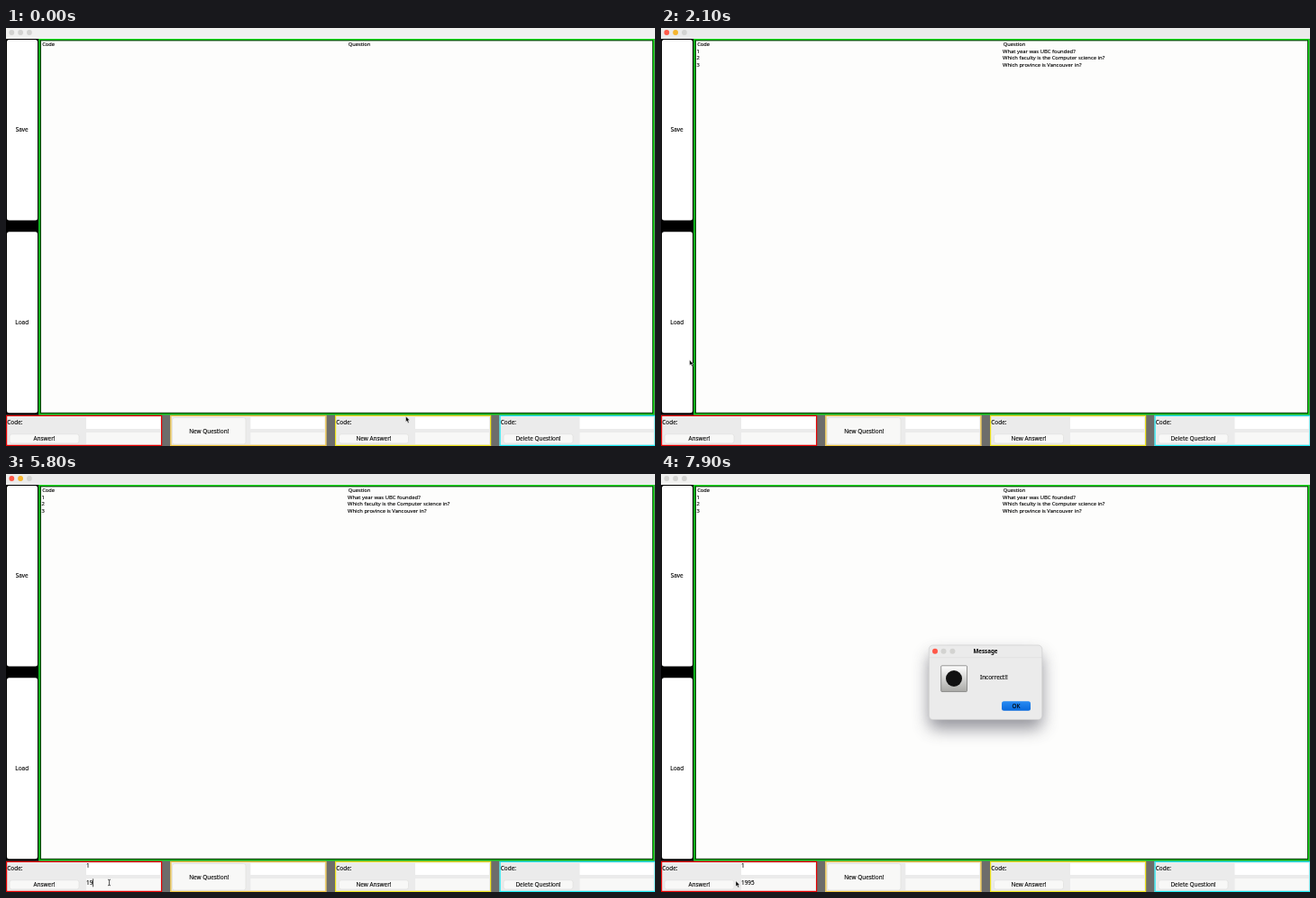
These frames come from a looping animation (720x464 px, 8000 ms). An HTML page:

```html
<!DOCTYPE html>
<html lang="en">
<head>
<meta charset="utf-8">
<title>Quiz window</title>
<style>
  html, body { margin: 0; width: 100%; height: 100%; overflow: hidden; }
  svg { display: block; width: 720px; height: 464px; }
  text { font: 6.4px "Noto Sans", "Open Sans", sans-serif; fill: #000; stroke: #000; stroke-width: .12px; white-space: pre; }
  .cell { font-size: 5.85px; }
  .head { font-size: 5.7px; }
  .title { font-size: 6.2px; font-weight: 600; stroke: none; }
  .mid { text-anchor: middle; }
</style>
</head>
<body>
<svg id="stage" viewBox="0 0 720 464">
  <defs>
    <filter id="blur" x="-50%" y="-50%" width="200%" height="200%"><feGaussianBlur stdDeviation="9"/></filter>
    <linearGradient id="tile" x2="0" y2="1"><stop stop-color="#fff"/><stop offset="1" stop-color="#a9a9a6"/></linearGradient>
    <linearGradient id="blue" x2="0" y2="1"><stop stop-color="#298bf2"/><stop offset="1" stop-color="#0869dc"/></linearGradient>
  </defs>
</svg>
<script>
const PANEL = '#ebebeb', PAPER = '#fdfdfc', FADED = '#d3d3d1', BUTTON = '#f8f8f7', EDGE = '#dcdcda';
const LIME = '#00e414', DARK_GREEN = '#064a08';
const stage = document.getElementById('stage');

const rect = (x, y, w, h, fill, extra = '') =>
  `<rect x="${x}" y="${y}" width="${w}" height="${h}" fill="${fill}" ${extra}/>`;
const dot = (x, y, r, fill, id = '') => `<circle id="${id}" cx="${x}" cy="${y}" r="${r}" fill="${fill}"/>`;
const text = (x, y, s, cls = '', id = '') => `<text x="${x}" y="${y}" class="${cls}" id="${id}">${s}</text>`;
const outline = color => `stroke="${color}" stroke-width=".6"`;

function sideButton(y, h, label, id) {
  return rect(1, y, 34, h, '#fff', `rx="2.5" id="${id}"`) + text(17.7, y + h / 2 + 2.2, label, 'mid');
}

function panel(x, color, label, button) {
  const [bx, by, bw, bh, id] = button.box;
  return rect(x, 430, 173, 34, PANEL)
    + rect(x + .6, 430.4, 172, 33, 'none', `stroke="${color}" stroke-width="1.2"`)
    + rect(x + 89, 432, 82, 13, '#fff') + rect(x + 89, 449, 82, 13, '#f8f8f7')
    + rect(bx, by, bw, bh, BUTTON, `rx="2.5" id="${id}" ${outline(EDGE)}`)
    + text(bx + bw / 2, by + bh / 2 + 2.3, button.label, 'mid')
    + (label ? text(x + 1.3, 440, label) : '');
}

function table() {
  const rows = ['What year was UBC founded?', 'Which faculty is the Computer science in?', 'Which province is Vancouver in?'];
  return rect(36.3, 12, 683, 417.4, LIME) + rect(37.6, 13.2, 680.4, 415, DARK_GREEN)
    + rect(39, 14.4, 678, 412.4, PAPER)
    + text(40.2, 19.7, 'Code', 'head') + text(379.8, 19.7, 'Question', 'head')
    + '<g id="rows">' + rows.map((q, i) =>
      text(39.6, 27.6 + i * 7.8, i + 1, 'cell') + text(379, 27.6 + i * 7.8, q, 'cell')).join('') + '</g>';
}

function dialog() {
  return '<g id="dialog">'
    + rect(297, 200, 126, 83, '#50505c', 'rx="8" opacity=".6" filter="url(#blur)"')
    + rect(297.3, 190, 125.5, 82.7, PANEL, `rx="4.5" ${outline('#c9c9c9')}`)
    + rect(297.5, 203.6, 125, .5, '#d8d8d8')
    + dot(304, 196.8, 3, '#ff5748') + dot(313.5, 196.8, 3, FADED) + dot(323.4, 196.8, 3, FADED)
    + text(360, 199, 'Message', 'mid title')
    + rect(310.7, 212.8, 28.8, 28.8, 'url(#tile)', 'stroke="#6e6e6c" stroke-width=".7" rx="1"')
    + dot(325, 227, 9, '#111')
    + text(354, 228.4, 'Incorrect!!')
    + rect(378, 252.3, 32, 10.5, 'url(#blue)', 'rx="2.5"')
    + text(394, 259.8, 'OK', 'mid') + '</g>';
}

stage.innerHTML += rect(0, 0, 720, 464, '#6d6d6b')
  + rect(0, 0, 720, 12, PANEL, 'id="titlebar"')
  + rect(0, 12, 36.3, 417.6, '#000')
  + ['close', 'minimize', 'zoom'].map((id, i) => dot(6.3 + i * 9.8, 5, 2.9, FADED, id)).join('')
  + table()
  + sideButton(13, 200.5, 'Save', 'save') + sideButton(226.3, 201, 'Load', 'load')
  + panel(0, '#e80000', 'Code:', { label: 'Answer!', box: [4, 450.8, 77, 10.2, 'answer'] })
  + panel(182.3, '#f0c43c', '', { label: 'New Question!', box: [184.5, 432.5, 81.5, 29.5, 'ask'] })
  + panel(365, '#eee31c', 'Code:', { label: 'New Answer!', box: [369.5, 450.8, 77, 10.2, 'reply'] })
  + panel(547.5, '#1cecf6', 'Code:', { label: 'Delete Question!', box: [552, 450.8, 77, 10.2, 'remove'] })
  + text(89, 437.4, '1', '', 'code') + text(89, 456.2, '', '', 'typed')
  + rect(89, 449.3, .7, 9, '#000', 'id="caret"')
  + dialog()
  + '<path id="arrow" d="M0 0V6.2L1.4 4.9L2.5 7.4L3.6 6.9L2.6 4.6H4.4Z" stroke="#fff" stroke-width=".45"/>'
  + '<path id="beam" d="M-1.5 -3.3Q0 -3.3 0 -2.5Q0 -3.3 1.5 -3.3M0 -2.5V2.7M-1.5 3.3Q0 3.3 0 2.5Q0 3.3 1.5 3.3" fill="none" stroke="#222" stroke-width=".75"/>';

const el = id => document.getElementById(id);
const show = (id, on) => el(id).setAttribute('visibility', on ? 'visible' : 'hidden');
const paint = (id, fill) => el(id).setAttribute('fill', fill);

// Pointer stops: time, x, y
const stops = [
  [0, 443.5, 431], [1100, 24, 362], [1900, 24, 362], [3000, 112.5, 435.3], [3900, 112.5, 435.3],
  [4300, 114.5, 453.5], [6400, 114.5, 453.5], [7400, 73.3, 454.5],
  [7500, 73.3, 454.5], [7900, 83, 451.7], [8000, 83, 451.7]
];

function pointerAt(t) {
  const i = stops.findIndex(s => s[0] > t);
  const [t0, x0, y0] = stops[i - 1], [t1, x1, y1] = stops[i];
  const p = (t - t0) / (t1 - t0), k = p * p * (3 - 2 * p);
  return [x0 + (x1 - x0) * k, y0 + (y1 - y0) * k];
}

function draw(now) {
  const t = Math.floor(now % 8000 / 100) * 100;
  const active = t >= 1300 && t < 7700;
  paint('titlebar', active ? PANEL : '#f1f1f0');
  paint('close', active ? '#ff5948' : FADED);
  paint('minimize', active ? '#f6b52e' : FADED);
  show('rows', t >= 1700);
  show('code', t >= 3500);
  show('dialog', t >= 7700);

  const count = [5500, 5800, 6000, 6100].filter(key => t >= key).length;
  el('typed').textContent = '1995'.slice(0, count);
  const blink = t < 5500 ? (t - 4200) % 1000 < 500 : t < 6600 || t >= 7100;
  const inCode = t >= 3100 && t < 4200;
  show('caret', inCode || (t >= 4200 && t < 7400 && blink));
  el('caret').setAttribute('x', 89 + 3.68 * (inCode ? +(t >= 3500) : count));
  el('caret').setAttribute('y', inCode ? 431.7 : 449.3);

  const pressed = t >= 7400 && t < 7700;
  el('answer').setAttribute('stroke', pressed ? '#5c5c5a' : EDGE);
  paint('answer', pressed ? '#e2e2e2' : BUTTON);

  const [x, y] = pointerAt(t);
  const overField = x > 89 && x < 171 && y > 431.5;
  show('beam', overField);
  show('arrow', !overField);
  for (const id of ['beam', 'arrow']) el(id).setAttribute('transform', `translate(${x} ${y})`);
}

const start = performance.now();
function tick() {
  draw(performance.now() - start);
  requestAnimationFrame(tick);
}
tick();
</script>
</body>
</html>
```
